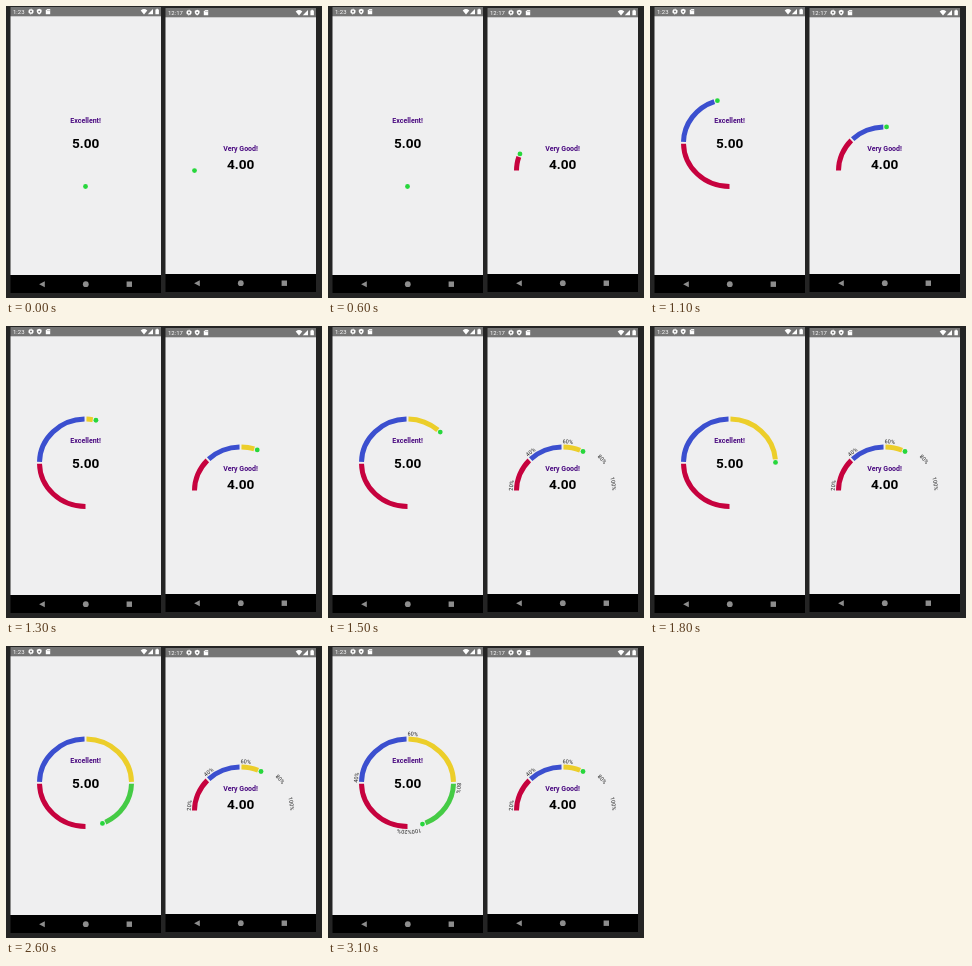
An HTML page that plays this animation: 316x292 px, repeating every 5000 ms.

```html
<!DOCTYPE html>
<html lang="en">
<head>
<meta charset="utf-8">
<style>
  html, body { margin: 0; width: 100%; height: 100%; overflow: hidden; background: #242424; }
  svg { display: block; width: 316px; height: 292px; font-family: Roboto, "Liberation Sans", sans-serif; }
  .clock { font-size: 6px; fill: #fff; }
  .rating { font-size: 7px; font-weight: 700; fill: #4a0a80; text-anchor: middle; }
  .score { font-size: 13.6px; font-weight: 700; fill: #000; text-anchor: middle; }
  .tick { font-size: 5.5px; fill: #222; }
</style>
</head>
<body>
<svg id="stage" viewBox="0 0 316 292">
  <defs>
    <g id="leftIcons" fill="#fff">
      <circle r="1.7" fill="none" stroke="#fff" stroke-width="1.4"/>
      <circle r="2.5" fill="none" stroke="#fff" stroke-width=".7" stroke-dasharray="1 .96"/>
      <path d="M8.2-2.8 10.6-1.8V.2Q10.4 2 8.2 2.9 6 2 5.8.2V-1.8Z"/>
      <circle cx="8.2" cy="0" r=".9" fill="#757575"/>
      <path d="M16.2-2.5H19.2V2.6H14.8V-1Z"/>
      <path d="M16.5-1.8v1.3M17.5-1.8v1.3M18.5-1.8v1.3" stroke="#757575" stroke-width=".4"/>
    </g>
    <g id="rightIcons" fill="#fff">
      <path d="M-3.3-1.2Q0-3.8 3.3-1.2L0 2.8Z"/>
      <path d="M9 2.6H3.8L9-2.6Z"/>
      <path d="M11.4-2.2h1v-.7h1.5v.7h1V2.7h-3.5Z"/>
    </g>
    <g id="navIcons" fill="#8d8d8d">
      <path d="M-46.7 0-41-3V3Z"/>
      <circle r="2.9"/>
      <rect x="40.8" y="-2.7" width="5.4" height="5.4"/>
    </g>
  </defs>
</svg>
<script>
const LOOP = 5000, RX = 46, RY = 43.7, GAP = 1.2;
const COLORS = ['#c6023e', '#3b4fcf', '#ecce2a', '#45cb45'];
const stage = document.getElementById('stage');

function add(parent, tag, attrs = {}, text = '') {
  const el = document.createElementNS('http://www.w3.org/2000/svg', tag);
  for (const key in attrs) el.setAttribute(key, attrs[key]);
  el.textContent = text;
  parent.append(el);
  return el;
}

function point(g, deg, grow = 0) {
  const a = deg * Math.PI / 180;
  return [g.cx + (RX + grow) * Math.cos(a), g.cy + (RY + grow) * Math.sin(a)];
}

// Drawn as two halves so that a full turn works too.
function arc(g, from, to, grow = 0) {
  const half = deg => `A${RX + grow} ${RY + grow} 0 0 1 ${point(g, deg, grow)}`;
  return `M${point(g, from, grow)}${half((from + to) / 2)}${half(to)}`;
}

const ease = t => (1 - Math.cos(Math.PI * Math.min(1, t))) / 2;

function interpolate(keys, time) {
  const next = keys.findIndex(k => k[0] > time);
  if (next < 0) return keys[keys.length - 1][1];
  const [t0, v0] = keys[next - 1], [t1, v1] = keys[next];
  return v0 + (v1 - v0) * (time - t0) / (t1 - t0);
}

const LEFT_PACE = [[0, 0], [699, 0], [700, .383], [900, .436], [1300, .542],
                   [1800, .697], [2600, .944], [2800, 1]];

const phones = [
  { id: 'full', x: 4.5, y: 1, w: 150.5, clock: '1:23', iconX: 25, rating: 'Excellent!', score: '5.00',
    ratingY: 117, scoreY: 141.8, cx: 79.5, cy: 136.8, start: 90, total: 360, sweep: 341,
    labelsAt: 2900, progress: time => ease(interpolate(LEFT_PACE, time)) },
  { id: 'half', x: 159.5, y: 2, w: 150.5, clock: '12:17', iconX: 183, rating: 'Very Good!', score: '4.00',
    ratingY: 145, scoreY: 163.2, cx: 234.5, cy: 164.6, start: 180, total: 180, sweep: 116.5,
    labelsAt: 1500, progress: time => time < 500 ? 0 : ease((time - 250) / 1215) }
];

function build(p) {
  const navY = p.id === 'full' ? 269 : 268;
  const rect = (y, height, fill) => add(stage, 'rect', { x: p.x, y, width: p.w, height, fill });
  rect(p.y, 9.2, '#757575');
  rect(p.y + 9.2, navY - p.y - 9.2, '#efeff0');
  rect(navY, 18, '#000');

  const iconY = p.y + 4.6;
  add(stage, 'text', { class: 'clock', x: p.x + 2.5, y: iconY + 2.2 }, p.clock);
  const use = (id, x, y) => add(stage, 'use', { href: '#' + id, x, y });
  use('leftIcons', p.iconX, iconY);
  use('rightIcons', p.x + 133.5, iconY);
  use('navIcons', p.cx + .3, navY + 9.2);

  add(stage, 'text', { class: 'rating', x: p.cx + .1, y: p.ratingY }, p.rating);
  add(stage, 'text', { class: 'score', x: p.cx + .2, y: p.scoreY }, p.score);

  p.segments = COLORS.map(stroke => add(stage, 'path', { fill: 'none', stroke, 'stroke-width': 5 }));
  p.dot = add(stage, 'circle', { r: 2.4, fill: '#27d73c' });

  p.labels = add(stage, 'g');
  add(p.labels, 'path', { id: p.id, d: arc(p, p.start, p.start + p.total, 3.6), fill: 'none' });
  for (let i = 0; i <= 4; i++) {
    const text = add(p.labels, 'text', { class: 'tick', 'text-anchor': i < 4 ? 'start' : 'end' });
    add(text, 'textPath', { href: '#' + p.id, startOffset: i * 25 + '%' }, (i + 1) * 20 + '%');
  }
}

function update(p, time) {
  const step = p.total / 4;
  const head = p.start + p.sweep * p.progress(time);
  p.segments.forEach((segment, i) => {
    const from = p.start + i * step + (i ? GAP : 0);
    const to = Math.min(p.start + (i + 1) * step - GAP, head - 4);
    segment.setAttribute('d', to > from ? arc(p, from, to) : '');
  });
  const [x, y] = point(p, head);
  p.dot.setAttribute('cx', x);
  p.dot.setAttribute('cy', y);
  p.labels.setAttribute('visibility', time >= p.labelsAt ? 'visible' : 'hidden');
}

phones.forEach(build);
const begin = performance.now();
function frame() {
  const time = (performance.now() - begin) % LOOP;
  phones.forEach(p => update(p, time));
  requestAnimationFrame(frame);
}
frame();
</script>
</body>
</html>
```
